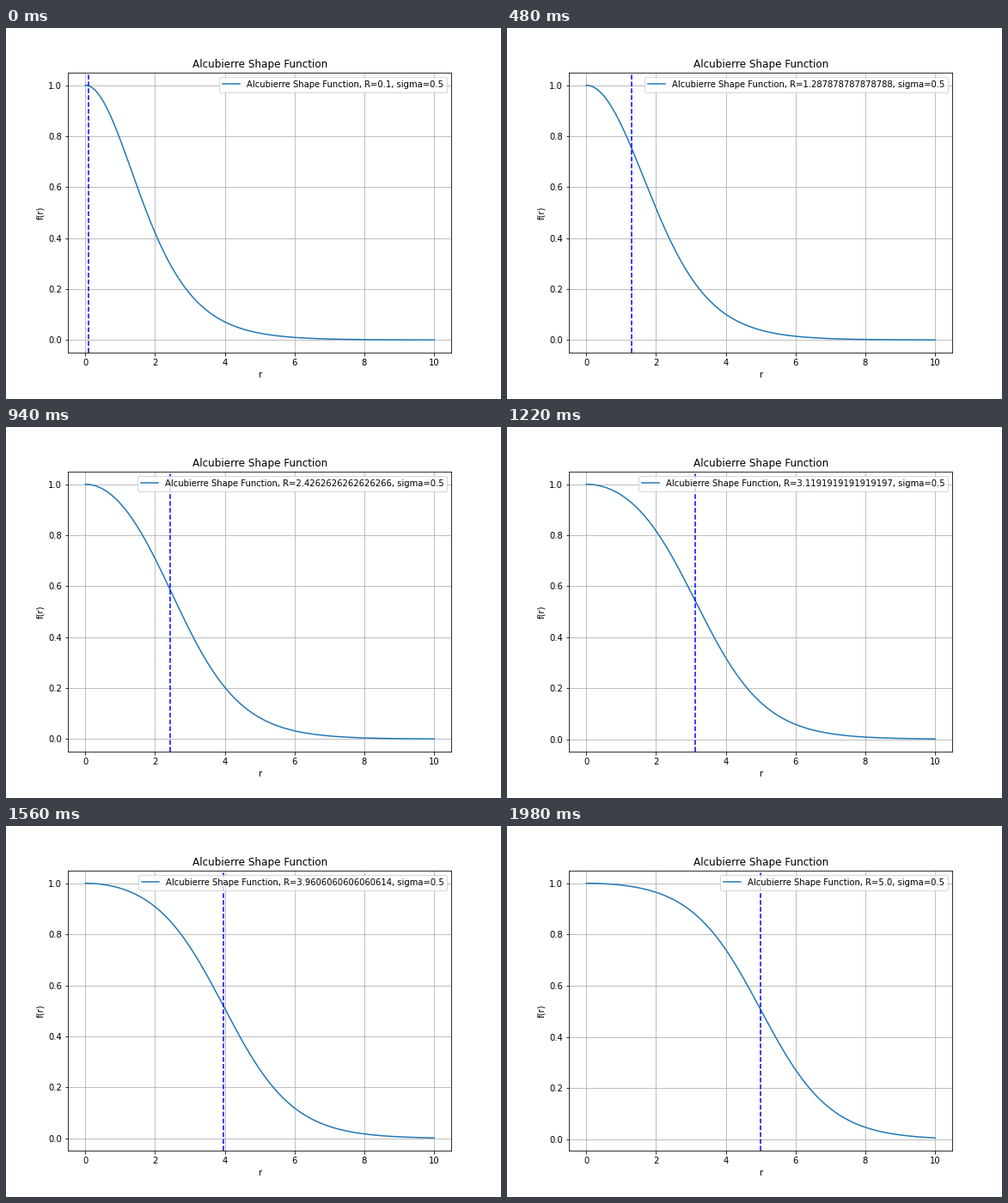
Animation of 576 by 432 pixels, one loop 2 s. Source, as a matplotlib script:

```python
import numpy as np
import matplotlib.pyplot as plt
from matplotlib.animation import FuncAnimation

SIGMA = 0.5
r = np.linspace(0, 10, 1000)
radii = np.linspace(0.1, 5, 100)


def shape(r, R, sigma):
    top = np.tanh(sigma * (r + R)) - np.tanh(sigma * (r - R))
    return top / (2 * np.tanh(sigma * R))


fig, ax = plt.subplots(figsize=(8, 6), dpi=72)
fig.subplots_adjust(left=0.125, right=0.9, bottom=0.125, top=0.88)

curve, = ax.plot(r, shape(r, radii[0], SIGMA), label="Alcubierre Shape Function")
marker = ax.axvline(radii[0], color="blue", linestyle="--")
ax.set_title("Alcubierre Shape Function")
ax.set_xlabel("r")
ax.set_ylabel("f(r)")
ax.set_xlim(-0.5, 10.5)
ax.grid(True)
label = ax.legend(loc="upper right").get_texts()[0]


def update(i):
    R = float(radii[i])
    f = shape(r, R, SIGMA)
    curve.set_ydata(f)
    marker.set_xdata([R, R])
    label.set_text(f"Alcubierre Shape Function, R={R}, sigma={SIGMA}")
    # The usual 5% margin, following the curve's range
    pad = 0.05 * (f.max() - f.min())
    ax.set_ylim(f.min() - pad, f.max() + pad)
    return curve, marker, label


anim = FuncAnimation(fig, update, frames=len(radii), interval=20,
                     repeat=True, repeat_delay=0)
plt.show()
```
